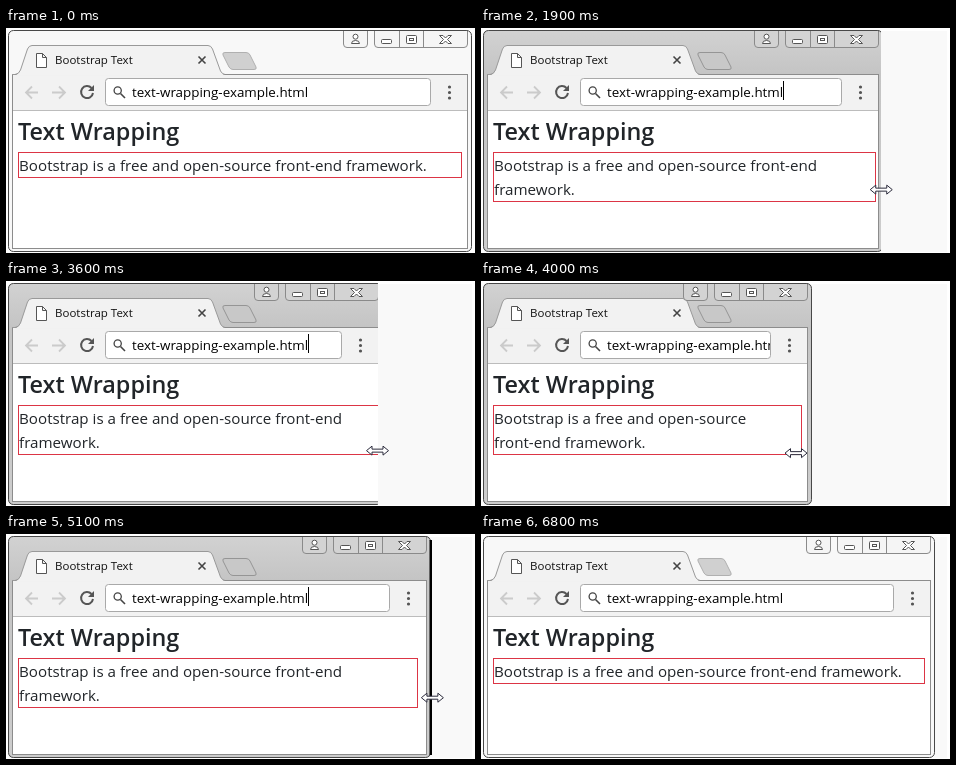
An HTML page for the animation above (6900 ms loop, 469 px wide and 225 px high).

```html
<!DOCTYPE html>
<html lang="en">
<head>
<meta charset="utf-8">
<title>Text wrapping</title>
<style>
html, body { margin: 0; width: 100%; height: 100%; overflow: hidden; background: #fff; }
svg { display: block; font-family: "Open Sans", "Noto Sans", sans-serif; fill: none; }
.box { border: 1px solid #dc3545; font-size: 15.16px; line-height: 24px; color: #212529; }
</style>
</head>
<body>
<svg width="469" height="225">
  <defs>
    <linearGradient id="glass" x2="0" y2="1">
      <stop stop-color="#d2d2d2"/><stop offset=".2" stop-color="#c4c4c4"/><stop offset="1" stop-color="#cdcdcd"/>
    </linearGradient>
    <clipPath id="clip"><rect id="clipBox" y="2" height="222"/></clipPath>
  </defs>

  <rect id="trail" x="3" y="3" width="463" height="221" fill="#f9f9f9"/>
  <g clip-path="url(#clip)">
    <rect id="frame" x="2" y="2" height="222" rx="5"/>
    <rect id="page" x="6.500" y="46.500" height="174" fill="#fff" stroke="#8c8c8c"/>
    <rect id="toolbar" x="7" y="47" height="35" fill="#f2f2f2"/>
    <path id="rule" stroke="#bcbcbc"/>
    <path d="M9 47.500Q13 46 14.500 42L21.500 21Q23 17.500 26 17.500H202Q205 17.500 206.500 21L214.500 43Q216 46 219 47.500Z" fill="#f2f2f2"/>
    <path d="M6 46.500H9Q13 46 14.500 42L21.500 21Q23 17.500 26 17.500H202Q205 17.500 206.500 21L214.500 43Q216 46 219 46.500" stroke="#999"/>
    <path id="newTab" d="M219 24.500H240Q243 24.500 244 27L250 39Q251 41.500 248 41.500H227Q224.500 41.500 223 39L217 27Q216 24.500 219 24.500Z"/>

    <path d="M30.500 25.500H36.500L40.500 29.500V39.500H30.500ZM36.500 25.500V29.500H40.500" fill="#fff" stroke="#555"/>
    <text x="49" y="36" font-size="11.5" fill="#111">Bootstrap Text</text>
    <path d="M192.500 28.500l7 7m0-7l-7 7" stroke="#444" stroke-width="1.600"/>

    <path d="M32 64.500H20m6-6l-6 6l6 6M46 64.500H59m-6-6l6 6l-6 6" stroke="#cbcbcb" stroke-width="1.800"/>
    <path d="M85.500 60A6 6 0 1 0 87 65" stroke="#555" stroke-width="2"/>
    <path d="M88 57V63H82Z" fill="#555"/>
    <rect id="address" x="99.500" y="50.500" height="27" rx="3" fill="#fff" stroke="#a9a9a9"/>
    <path d="M114.500 65.500l4.500 4.500" stroke="#444" stroke-width="1.600"/>
    <circle cx="111.700" cy="62.500" r="3.600" stroke="#444" stroke-width="1.300"/>
    <svg id="field" x="100" y="51" height="26">
      <text x="26" y="18" font-size="13.38" fill="#000">text-wrapping-example.html</text>
      <path id="caret" d="M202.500 2V21" stroke="#000"/>
    </svg>

    <text x="12" y="112" font-size="23.4" font-weight="600" fill="#212529">Text Wrapping</text>
    <foreignObject id="content" x="12" y="124" height="90">
      <div class="box">Bootstrap is a free and open-source <span style="white-space: nowrap">front-end</span> framework.</div>
    </foreignObject>

    <g id="controls">
      <g id="buttons" stroke="#8a8a8a">
        <path d="M-128.500 2.500V16Q-128.500 19.500 -125 19.500H-108Q-104.500 19.500 -104.500 16V2.500Z"/>
        <path d="M-97.500 2.500V16Q-97.500 19.500 -94 19.500H-8Q-4.500 19.500 -4.500 16V2.500ZM-72.500 2.500V19.500M-48.500 2.500V19.500"/>
      </g>
      <g fill="#fff" stroke="#555">
        <circle cx="-116.500" cy="8.700" r="2.500"/>
        <path d="M-120.500 15.500Q-120.500 12.500 -116.500 12.500T-112.500 15.500Z"/>
        <rect x="-90.500" y="11.500" width="10" height="4" rx="1"/>
        <rect x="-65.500" y="7.500" width="10" height="8" rx="1"/>
        <rect x="-62.500" y="10.500" width="4" height="2"/>
        <path d="M-32.500 7.500h3.500l2.500 2.500l2.500-2.500h3.500l-4 4l4 4h-3.500l-2.500-2.500l-2.500 2.500h-3.500l4-4Z"/>
      </g>
      <path d="M-22.500 59v.01M-22.500 64.500v.01M-22.500 70v.01" stroke="#555" stroke-width="3.200" stroke-linecap="round"/>
    </g>
    <rect id="border" x="2.500" y="2.500" height="221" rx="5" stroke="#484848"/>
  </g>
  <rect id="dark" y="6" width="2.500" height="215" fill="#000"/>
  <path id="arrow" d="M.5 .5V16L4 12.700L6.500 18.500L9 17.500L6.500 11.800H11.500Z" fill="#fff" stroke="#000"/>
  <path id="resize" d="M-11 0L-5.500-4.500V-1.500H5.500V-4.500L11 0L5.500 4.500V1.500H-5.500V4.500Z" fill="#fff" stroke="#2b2b3c"/>
</svg>
<script>
const LOOP = 6900, STEP = 100, MIN_WIDTH = 331;
const $ = id => document.getElementById(id);
const set = (id, attrs) => {
  for (const name in attrs) $(id).setAttribute(name, attrs[name]);
};
const show = (id, on) => set(id, { visibility: on ? "visible" : "hidden" });

// Pointer path: time, x, y
const path = [
  [100, 473, 140], [800, 461, 163], [1000, 466, 163], [1300, 466, 163],
  [1400, 459, 163], [1900, 402, 161.5], [2000, 395, 162], [2300, 389, 165],
  [2600, 389, 167], [2900, 427, 168], [3300, 446, 169], [3600, 377, 169.5],
  [3700, 355, 170], [4000, 318, 172], [4100, 306, 172.5], [4200, 311, 172.5],
  [4300, 311, 172], [4600, 366, 164], [5000, 417, 164], [5400, 447, 163],
  [5500, 447, 163], [5700, 451, 163], [6100, 454, 164.5]
];

function pointer(t) {
  const i = path.findIndex(key => key[0] > t);
  if (i < 0) return path[path.length - 1].slice(1);
  if (i === 0) return path[0].slice(1);
  const [t0, x0, y0] = path[i - 1], [t1, x1, y1] = path[i];
  const k = (t - t0) / (t1 - t0);
  return [x0 + (x1 - x0) * k, y0 + (y1 - y0) * k];
}

const windowWidth = t => t <= 1300 ? 466 : Math.round(Math.max(MIN_WIDTH, pointer(t)[0]));

function draw(t) {
  const width = windowWidth(t);
  const edge = Math.min(width, windowWidth(t + 25));   // a shrinking window is cut off early
  const pageWidth = windowWidth(t - 30);               // page layout lags behind the window
  const active = t >= 1200 && t < 6800;

  show("trail", t >= 1400);
  set("clipBox", { width: edge });
  set("border", { width: width - 3 });
  set("frame", { width: width - 2, fill: active ? "url(#glass)" : "#f8f8f8" });
  set("page", { width: width - 11 });
  set("toolbar", { width: width - 12 });
  set("rule", { d: `M7 82.500H${width - 5}` });
  set("newTab", { fill: active ? "#c8c8c8" : "#d0d0d0", stroke: active ? "#959595" : "#b0b0b0" });
  set("address", { width: width - 141 });
  set("field", { width: width - 142 });
  set("controls", { transform: `translate(${width})` });
  set("buttons", { fill: active ? "#d3d3d3" : "#f5f5f5" });
  set("content", { width: pageWidth - 22 });

  show("caret", t >= 1200 && t < 6600);
  show("dark", width - pageWidth > 1);
  set("dark", { x: width - 1.5 });

  const [x, y] = pointer(t + (t > 1300 ? 25 : 0));
  show("arrow", t >= 200 && t < 800);
  show("resize", t >= 800 && t < 6300);
  for (const id of ["arrow", "resize"]) set(id, { transform: `translate(${x} ${y})` });
}

const start = performance.now();
function tick() {
  const t = (performance.now() - start) % LOOP;
  draw(Math.floor(t / STEP) * STEP);
  requestAnimationFrame(tick);
}
tick();
</script>
</body>
</html>
```
